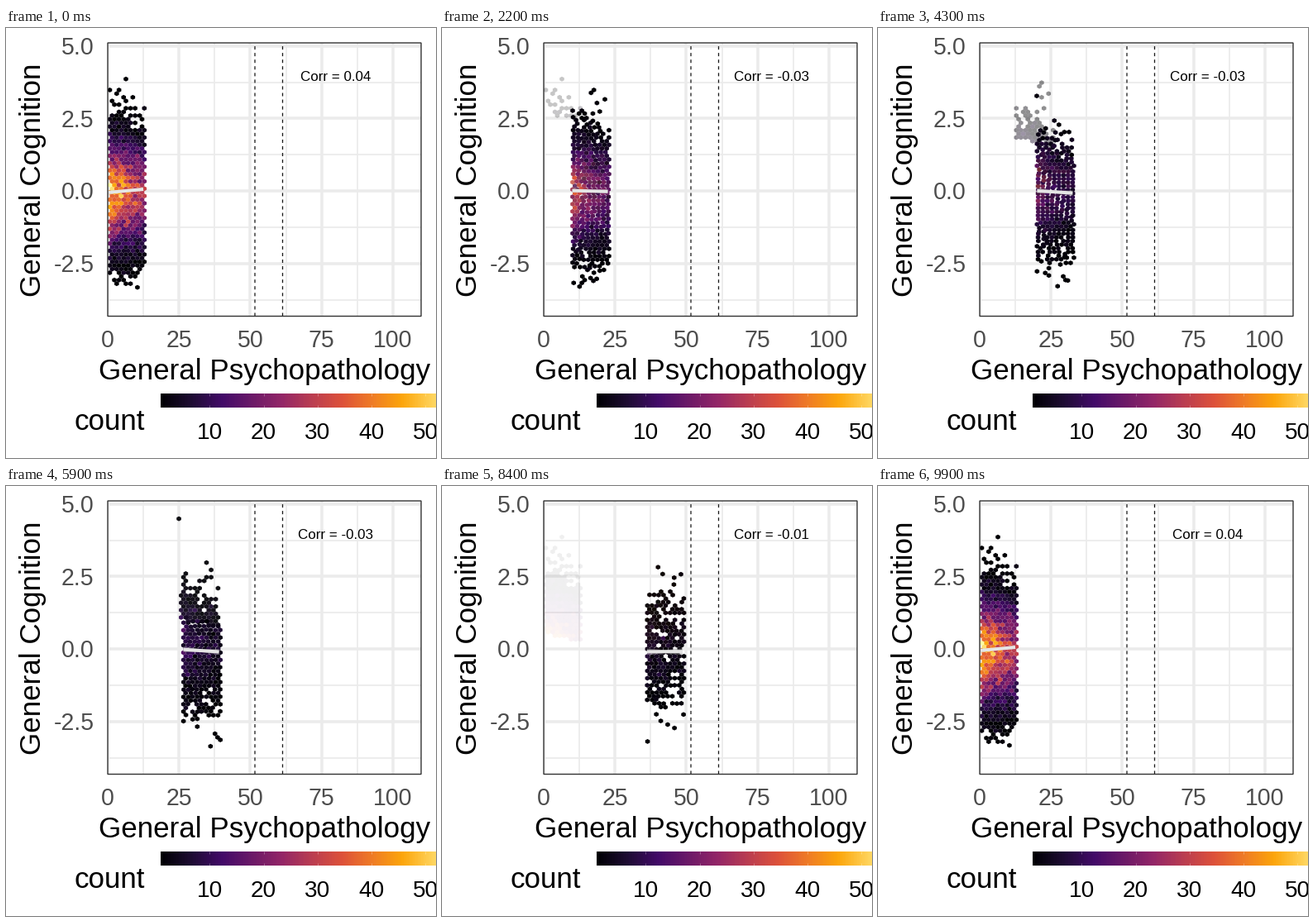
Animation, 520 px wide and 520 px high, one loop 10 s. Source, as a matplotlib script:

```python
import numpy as np
import matplotlib.pyplot as plt
from matplotlib.animation import FuncAnimation
from matplotlib.collections import PolyCollection
from matplotlib.colors import LinearSegmentedColormap
from matplotlib.patches import Rectangle

SIZE = 520
PT = 0.72                              # points per pixel at 100 dpi
LEFT, RIGHT, TOP, BOTTOM = 123, 502, 18, 348.5
COL, ROW = 5.57, 4.42                  # hexagon spacing
X0, Y0 = 125.5, 39.6
STEP, WIDTH = 44.4, 46                 # window offset and width
MAX_COUNT = 57

plt.rcParams["font.family"] = "Liberation Sans"
INFERNO = LinearSegmentedColormap.from_list("inferno_lab", [
    "#000004", "#1E0C33", "#420A68", "#6B1968", "#932667", "#BA3D51",
    "#DD513A", "#EF7B26", "#FCA50A", "#FFD259", "#FCFFA4"])

# Label, trend heights at both ends, highest and lowest bin of each window.
WINDOWS = [
    ("Corr = 0.04", (199, 195), (145, 62), (157, 313)),
    ("Corr = -0.03", (196, 198.5), (196, 66), (178, 313)),
    ("Corr = -0.03", (197.5, 200.5), (211, 40), (244, 318)),
    ("Corr = -0.01", (200.5, 200.5), (269, 92), (257, 309)),
]
# First and last step of each move between windows.
MOVES = [(8, 26), (34, 50), (58, 74), (83, 99)]


def center(row, col):
    return X0 + COL * (col + 0.5 * (row % 2)), Y0 + ROW * row


def snap(x, y):
    row = round((y - Y0) / ROW)
    return row, round((x - X0) / COL - 0.5 * (row % 2))


def expected(x, y):
    """Mean count: decays to the right, bell-shaped in height."""
    u = max(0, (x - LEFT) / STEP)
    spread = 36.5 - u
    return 50 * np.exp(-0.64 * u ** 1.2 - 0.5 * ((y - 200) / spread) ** 2)


def make_bins(k, rng):
    """Return bin centres and colours, ordered from the bottom up."""
    start = LEFT - 1 + STEP * k
    top, bottom = snap(*WINDOWS[k][2]), snap(*WINDOWS[k][3])
    counts = {top: 1, bottom: 1}
    for row in range(top[0] + 1, bottom[0]):
        for col in range(40):
            x, y = center(row, col)
            if start <= x <= start + WIDTH:
                count = rng.poisson(expected(x, y))
                if count:
                    counts[row, col] = count
    cells = sorted(counts, key=lambda c: (-c[0], c[1]))
    pos = np.array([center(*c) for c in cells])
    level = np.array([(counts[c] - 1) / (MAX_COUNT - 1) for c in cells])
    # Blocks of about one row run left to right, so windows keep their width.
    order = np.lexsort((pos[:, 0], np.arange(len(pos)) // 8))
    return pos[order], INFERNO(level[order])


def trend_line(k):
    x = LEFT + STEP * k
    y1, y2 = WINDOWS[k][1]
    return np.array([x, y1, x + 43, y2, 2.2 + 0.6 * k])


rng = np.random.default_rng(7)
BINS = [make_bins(k, rng) for k in range(len(WINDOWS))]
ANGLES = np.radians(np.arange(30, 390, 60))
HEX = np.column_stack([np.cos(ANGLES) * COL / np.sqrt(3),
                       np.sin(ANGLES) * ROW * 2 / 3])


def stage(step):
    """Return the current window and the progress towards the next one."""
    for i, (start, end) in enumerate(MOVES):
        if step <= end:
            return i, max(0, (step - start) / (end - start))
    return 0, 0


def mix(a, b, t):
    return a + (b - a) * t


def faded(bins, first, alpha):
    pos, color = bins[0][first:], bins[1][first:].copy()
    color[:, 3] = alpha
    return pos, color


fig = plt.figure(figsize=(5.2, 5.2), dpi=100, facecolor="white")
ax = fig.add_axes([0, 0, 1, 1])
ax.axis("off")


def write(x, y, text, size, color="black", ha="center", **kw):
    return ax.text(x, y, text, fontsize=size * PT, color=color, ha=ha,
                   va="baseline", **kw)


panel = Rectangle((LEFT, TOP), RIGHT - LEFT, BOTTOM - TOP, fill=False,
                  edgecolor="#333333", linewidth=1.4 * PT, zorder=8,
                  snap=False)
ax.add_patch(panel)


def panel_line(xs, ys, width, color, z, **kw):
    line, = ax.plot(xs, ys, color=color, linewidth=width * PT, zorder=z,
                    solid_capstyle="butt", **kw)
    line.set_clip_path(panel)
    return line


# Grid and axis labels
for i in range(9):
    x = LEFT + 43.12 * i
    panel_line([x, x], [TOP, BOTTOM], 1.8 if i % 2 else 3.5, "#EBEBEB", 1)
    if i % 2 == 0:
        write(x, 386, f"{12.5 * i:.0f}", 28.5, "#4D4D4D")
for i in range(8):
    y = 21.7 + 43.88 * i
    panel_line([LEFT, RIGHT], [y, y], 1.8 if i % 2 else 3.5, "#EBEBEB", 1)
    if i % 2 == 0:
        write(106.5, y + 10.2, f"{5 - 1.25 * i:.1f}", 28.5, "#4D4D4D", "right")
write(312.5, 425.5, "General Psychopathology", 35)
write(42, 183.5, "General Cognition", 35, rotation=90, rotation_mode="anchor")

for x in (301, 334.5):
    panel_line([x, x], [BOTTOM, TOP], 1.3, "#1A1A1A", 6, snap=False,
               dashes=(3.1, 3.1), dash_capstyle="butt")

# Colour bar
PER_COUNT = 6.53
bar_end = 187 + PER_COUNT * (MAX_COUNT - 1)
ax.imshow(np.linspace(0, 1, 300)[None, :], cmap=INFERNO, aspect="auto",
          extent=(187, bar_end, 459, 442))
write(83, 485.5, "count", 35, ha="left")
for count in range(10, 60, 10):
    x = 187.5 + PER_COUNT * (count - 1)
    write(x, 497, str(count), 28)
    for ya, yb in ((442, 445), (456, 459)):
        ax.plot([x, x], [ya, yb], color="white", alpha=0.4,
                linewidth=0.7 * PT, solid_capstyle="butt")

# Moving parts
hexes = PolyCollection([HEX], linewidths=0, edgecolors="none", zorder=3)
ribbon = PolyCollection([HEX], linewidths=0, facecolors=(0.6, 0.6, 0.6, 0.5),
                        zorder=4)
for part in (hexes, ribbon):
    ax.add_collection(part)
    part.set_clip_path(panel)
trend = panel_line([0, 0], [0, 0], 4, "#E5E5E5", 5)
corr = write(398.5, 64, "", 17)

ax.set_xlim(0, SIZE)
ax.set_ylim(SIZE, 0)


def draw(step):
    i, t = stage(step)
    j = (i + 1) % len(WINDOWS)
    (pa, ca), (pb, cb) = BINS[i], BINS[j]
    n = min(len(pa), len(pb))
    groups = [(mix(pa[:n], pb[:n], t), mix(ca[:n], cb[:n], t)),
              faded(BINS[i], n, 1 - t), faded(BINS[j], n, t)]
    pos = np.concatenate([g[0] for g in groups])
    color = np.concatenate([g[1] for g in groups])
    hexes.set_verts(pos[:, None, :] + HEX)
    hexes.set_facecolor(color)

    x1, y1, x2, y2, h = mix(trend_line(i), trend_line(j), t)
    trend.set_data([x1, x2], [y1, y2])
    xm, ym = (x1 + x2) / 2, (y1 + y2) / 2
    ribbon.set_verts([[(x1, y1 - h), (xm, ym - h / 2), (x2, y2 - h),
                       (x2, y2 + h), (xm, ym + h / 2), (x1, y1 + h)]])
    corr.set_text(WINDOWS[i if t <= 0.5 else j][0])
    return hexes, ribbon, trend, corr


anim = FuncAnimation(fig, draw, frames=100, interval=100, repeat=True,
                     repeat_delay=0, blit=False)
plt.show()
```
